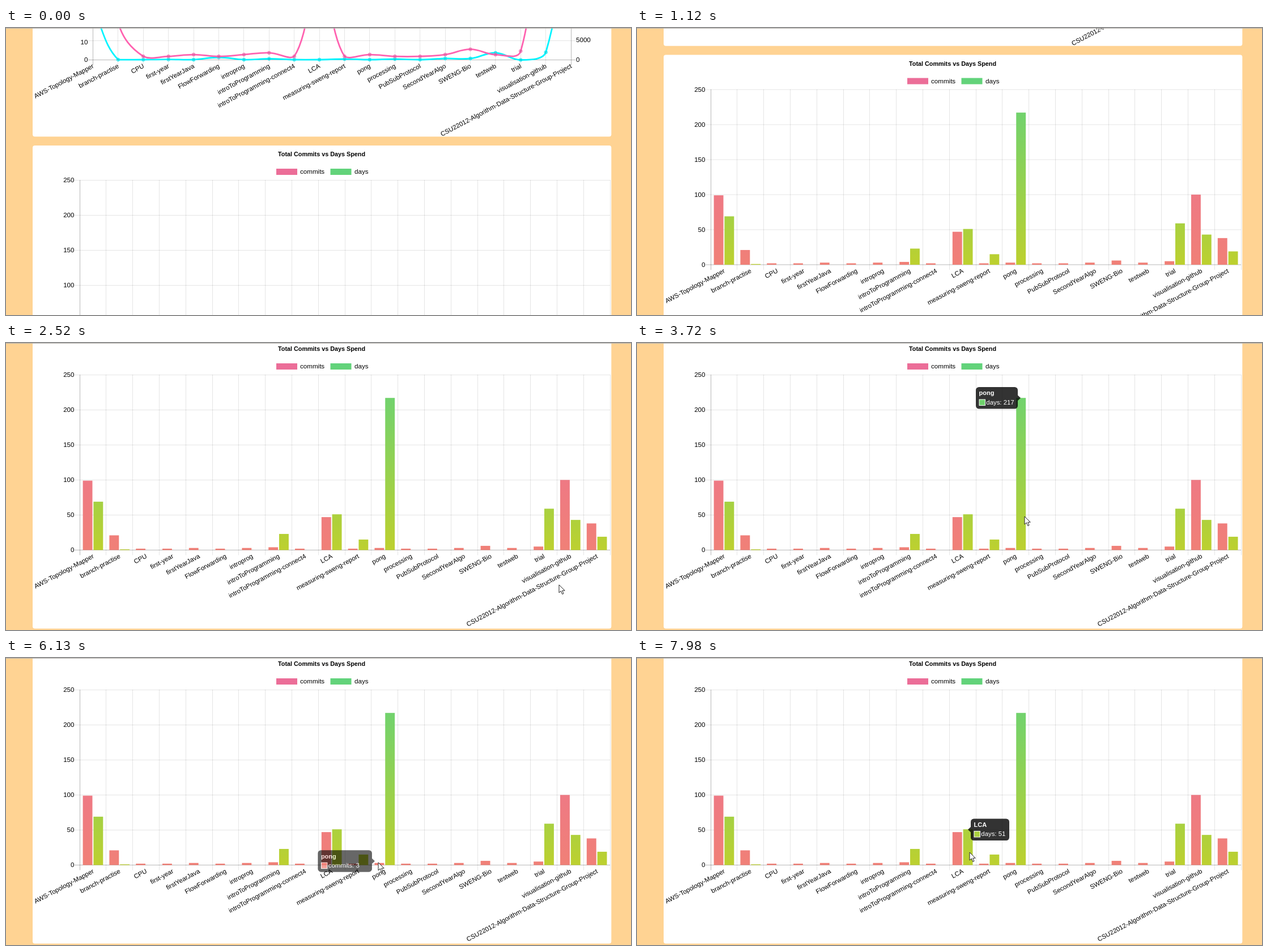
An HTML page that plays this animation: 1103x508 px, repeating every 8 s.

```html
<!DOCTYPE html>
<html lang="en">
<head>
<meta charset="utf-8">
<title>Commits and days</title>
<style>
html, body { margin: 0; width: 100%; height: 100%; overflow: hidden; background: #ffd393; }
svg { display: block; width: 1103px; height: 508px; }
text { font: 11.4px "Liberation Sans", Arial, sans-serif; fill: #000; }
text.num { font-size: 11.6px; }
text.bold { font-weight: bold; font-size: 10.8px; }
.tip text { fill: #fff; font-size: 11.4px; }
.tip text.bold { font-size: 11px; }
</style>
</head>
<body>
<svg id="stage" viewBox="0 0 1103 508">
  <defs>
    <linearGradient id="pink" gradientUnits="userSpaceOnUse" x1="0" y1="225" x2="0" y2="580">
      <stop offset="0" stop-color="#eb6c9b"/><stop offset="1" stop-color="#f08077"/>
    </linearGradient>
    <linearGradient id="green" gradientUnits="userSpaceOnUse" x1="0" y1="225" x2="0" y2="580">
      <stop offset="0" stop-color="#5ad381"/><stop offset="1" stop-color="#bdd02f"/>
    </linearGradient>
  </defs>
</svg>
<script>
const LOOP = 8000;
const names = ['AWS-Topology-Mapper', 'branch-practise', 'CPU', 'first-year', 'firstYearJava',
  'FlowForwarding', 'introprog', 'introToProgramming', 'introToProgramming-connect4', 'LCA',
  'measuring-sweng-report', 'pong', 'processing', 'PubSubProtocol', 'SecondYearAlgo',
  'SWENG-Bio', 'testweb', 'trial', 'visualisation-github',
  'CSU22012-Algorithm-Data-Structure-Group-Project'];
const commits = [99, 21, 2, 2, 3, 2, 3, 4, 2, 47, 2, 3, 2, 2, 3, 6, 3, 5, 100, 38];
const days = [69, 1, 0, 0, 0, 0, 0, 23, 0, 51, 15, 217, 0, 0, 0, 0, 0, 59, 43, 19];
const sizeY = [-35, 56, 56, 55.7, 56, 52, 56, 54.5, 56, 56, 55, 56, 55, 56, 54, 54, 44, 56.5, 43, -250];

const stage = document.getElementById('stage');
function add(parent, tag, attrs, content) {
  const el = document.createElementNS('http://www.w3.org/2000/svg', tag);
  for (const k in attrs) el.setAttribute(k, attrs[k]);
  if (content !== undefined) el.textContent = content;
  parent.appendChild(el);
  return el;
}
const page = add(stage, 'g', {});

function line(x1, y1, x2, y2, strong) {
  add(page, 'path', { d: `M${x1} ${y1}L${x2} ${y2}`, stroke: '#000', 'stroke-opacity': strong ? .28 : .1 });
}
function label(x, y, str, anchor = 'start', cls = 'num') {
  return add(page, 'text', { x, y, dy: '.35em', 'text-anchor': anchor, class: cls }, str);
}
function slanted(x, y, str) {
  const el = label(0, 0, str, 'end', '');
  el.setAttribute('transform', `translate(${x} ${y}) rotate(-28)`);
}
function panel(y, height) {
  add(page, 'rect', { x: 47, y, width: 1021.3, height, rx: 4, fill: '#fff' });
}
const snap = v => Math.floor(v) + .5;

// Cardinal spline whose handles stay above the axis
function spline(pts, base, tension = .4) {
  const cap = y => Math.min(y, base);
  const handles = pts.map((p, i) => {
    const a = pts[i - 1] || p, b = pts[i + 1] || p;
    const da = Math.hypot(p[0] - a[0], p[1] - a[1]), db = Math.hypot(b[0] - p[0], b[1] - p[1]);
    const fa = tension * da / (da + db), fb = tension * db / (da + db);
    const dx = b[0] - a[0], dy = b[1] - a[1];
    return [[p[0] - fa * dx, cap(p[1] - fa * dy)], [p[0] + fb * dx, cap(p[1] + fb * dy)]];
  });
  return pts.map((p, i) => i ? `C${handles[i - 1][1]} ${handles[i][0]} ${p}` : `M${p}`).join('');
}

function lineChart() {
  const x0 = 153.5, step = 44.4, base = 56.5;
  panel(-400, 592.3);
  names.forEach((n, i) => {
    const x = x0 + i * step;
    line(snap(x), -10, snap(x), base + 9, i === 0 || i === 19);
    slanted(x + .3, base + 9.7, n);
  });
  line(145, 22.5, 1005, 22.5);
  line(145, base, 1005, base, true);
  label(144.5, 25, '10', 'end');
  label(144.5, 56, '0', 'end');
  label(1006, 21, '5000');
  label(1006, 56, '0');
  const curve = (ys, color) => {
    const pts = ys.map((y, i) => [x0 + i * step, y]);
    add(page, 'path', { d: spline(pts, base), fill: 'none', stroke: color, 'stroke-width': 2.8 });
    pts.forEach(([cx, cy]) => add(page, 'circle',
      { cx, cy, r: 2.8, fill: '#000', 'fill-opacity': .1, stroke: color, 'stroke-width': 1 }));
  };
  curve(sizeY, '#00f4ff');
  curve(commits.map(v => base - v * 3.14), '#ff62b0');
}

const bars = [];
const zero = 579.5, unit = 1.241;
function barChart() {
  const x0 = 130, step = 46.8;
  panel(208, 510.5);
  label(557, 223.5, 'Total Commits vs Days Spend', 'middle', 'bold');
  add(page, 'rect', { x: 477, y: 249, width: 37, height: 11, fill: 'url(#pink)' });
  add(page, 'rect', { x: 572.5, y: 249, width: 37, height: 11, fill: 'url(#green)' });
  label(519, 254, 'commits');
  label(615, 254, 'days');
  for (let v = 0; v <= 250; v += 50) {
    const y = snap(zero - v * unit);
    line(121, y, 1066, y, v === 0);
    label(120.5, y - .5, String(v), 'end');
  }
  for (let i = 0; i <= 20; i++) line(snap(x0 + i * step), 269, snap(x0 + i * step), zero + 9, i === 0);
  names.forEach((n, i) => {
    const x = x0 + i * step;
    [[commits, 5.6, 'pink'], [days, 24.4, 'green']].forEach(([data, dx, fill]) => {
      const el = add(page, 'rect', { x: x + dx, width: 16.9, fill: `url(#${fill})` });
      bars.push({ el, h: data[i] * unit });
    });
    slanted(x + step / 2 + .6, zero + 9.7, n);
  });
}

lineChart();
barChart();
add(stage, 'rect', { width: 1103, height: 1, fill: '#b4b0aa' });

// Tooltips in stage coordinates; each one slides over from the one before
const tips = [
  { x: 598, y: 78, w: 74, title: 'pong', body: 'days: 217', color: '#70d16d', from: 3330, to: 4240 },
  { x: 487, y: 329, w: 138, title: 'measuring-sweng-report', body: 'days: 15', color: '#b8d033', from: 5370, to: 5850 },
  { x: 572, y: 344, w: 81, title: 'pong', body: 'commits: 3', color: '#f08077', from: 6015, to: 6650 },
  { x: 589, y: 284.5, w: 68, title: 'LCA', body: 'days: 51', color: '#abd03f', from: 7540, to: 9000, flip: true }
];
const tip = add(stage, 'g', { class: 'tip' });
const tipBox = add(tip, 'rect', { height: 38.5, rx: 5.5, fill: '#000', 'fill-opacity': .8 });
const caret = add(tip, 'path', { fill: '#000', 'fill-opacity': .8 });
const tipTitle = add(tip, 'text', { x: 5.5, y: 10.5, dy: '.35em', class: 'bold' });
add(tip, 'rect', { x: 5.5, y: 21.5, width: 11.5, height: 11.5, fill: '#fff' });
const swatch = add(tip, 'rect', { x: 6.5, y: 22.5, width: 9.5, height: 9.5 });
const tipBody = add(tip, 'text', { x: 18.3, y: 27, dy: '.35em' });

const cursor = add(stage, 'path', {
  d: 'M0 0V14L3.3 11L5.7 16.6L8 15.6L5.7 10.2H10.2Z', fill: '#fff', stroke: '#222', 'stroke-width': 1, 'stroke-linejoin': 'round'
});

const clamp = p => Math.max(0, Math.min(1, p));
const outQuart = p => 1 - (1 - clamp(p)) ** 4;
const smooth = p => p * p * (3 - 2 * p);
const mix = (a, b, p) => a + (b - a) * p;

// Keys are [time, value, value, ...]
function track(keys, t, ease = p => p) {
  const i = keys.findIndex(k => k[0] > t);
  if (i === 0) return keys[0].slice(1);
  if (i < 0) return keys[keys.length - 1].slice(1);
  const a = keys[i - 1], b = keys[i], p = ease((t - a[0]) / (b[0] - a[0]));
  return a.slice(1).map((v, j) => mix(v, b[j + 1], p));
}
const scrollKeys = [[20, 0], [280, 53], [500, 99], [640, 106.5], [860, 106.5], [1120, 160.5], [1470, 160.5], [1720, 213]];
const cursorKeys = [[2520, 976, 428], [3300, 684, 307], [4080, 684, 307], [4650, 654, 361],
  [5040, 654, 361], [5370, 632, 355], [5830, 632, 355], [6020, 657, 362], [6650, 657, 361],
  [7040, 556, 336], [7150, 556, 336], [7540, 587, 344]];

function drawTip(t) {
  const i = tips.findLastIndex(k => t >= k.from);
  const cur = tips[i];
  const alpha = cur ? outQuart((t - cur.from) / 400) * (1 - outQuart((t - cur.to) / 400)) : 0;
  tip.setAttribute('opacity', alpha);
  if (!cur) return;
  const old = tips[i - 1] || cur, p = outQuart((t - cur.from) / 400);
  const w = mix(old.w, cur.w, p);
  tip.setAttribute('transform', `translate(${mix(old.x, cur.x, p)} ${mix(old.y, cur.y, p)})`);
  tipBox.setAttribute('width', w);
  caret.setAttribute('d', cur.flip ? 'M0 14.5L-5 19.2L0 24Z' : `M${w} 14.5l5 4.7l-5 4.8Z`);
  swatch.setAttribute('fill', cur.color);
  tipTitle.textContent = cur.title;
  tipBody.textContent = cur.body;
}

function draw(t) {
  page.setAttribute('transform', `translate(0 ${-track(scrollKeys, t)[0]})`);
  const grow = outQuart((t - 120) / 1000);
  for (const { el, h } of bars) {
    el.setAttribute('y', zero - h * grow);
    el.setAttribute('height', h * grow);
  }
  drawTip(t);
  const [x, y] = track(cursorKeys, t, smooth);
  cursor.setAttribute('transform', `translate(${x} ${y})`);
  cursor.setAttribute('visibility', t >= 2515 ? 'visible' : 'hidden');
}

const start = performance.now();
function frame() {
  draw((performance.now() - start) % LOOP);
  requestAnimationFrame(frame);
}
frame();
</script>
</body>
</html>
```
